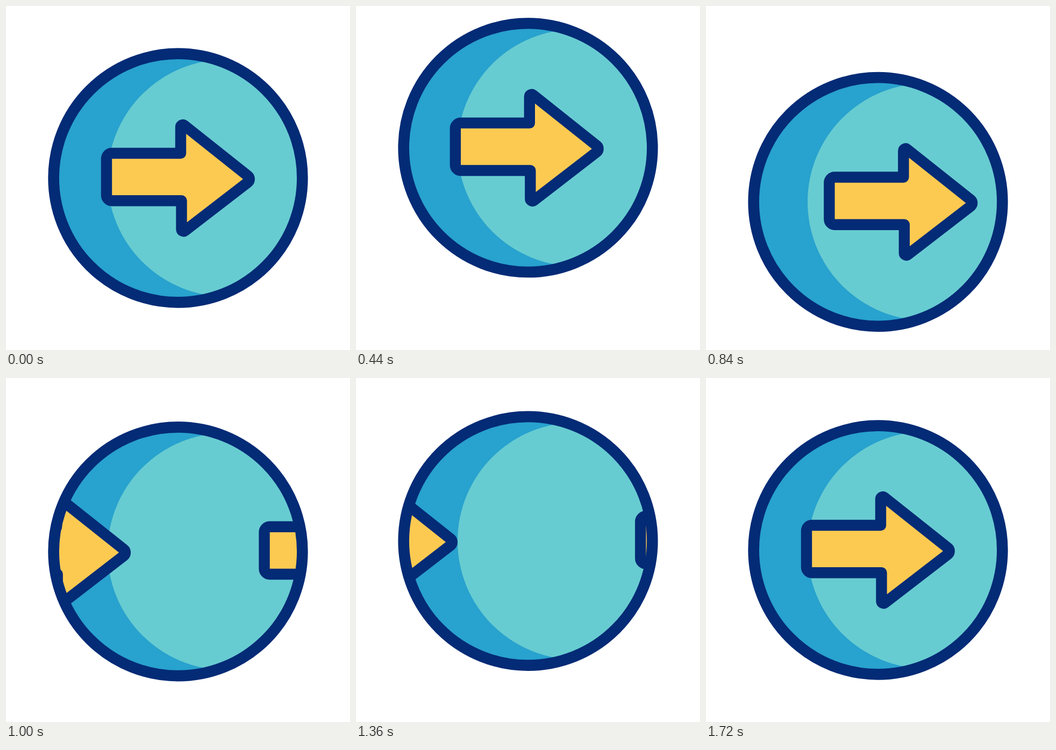
Recreate the animation shown at these times as an HTML page. Size 640 by 640 pixels, loop 2000 ms.

```html
<!DOCTYPE html>
<html lang="en">
<head>
<meta charset="utf-8">
<title>Bouncing arrow button</title>
<style>
  html, body { margin: 0; width: 100%; height: 100%; overflow: hidden; background: #fff; }
  svg { display: block; width: 100%; height: 100%; }
</style>
</head>
<body>
<svg viewBox="0 0 640 640">
  <defs>
    <clipPath id="disc"><circle cx="320" cy="320" r="231"/></clipPath>
    <path id="arrow" fill="#fdca51" stroke="#042b76" stroke-width="20.4" stroke-linejoin="round"
      d="M325 274V225A4 4 0 0 1 331.5 221.9L449.9 316A7.7 7.7 0 0 1 449.8 328.1L333 418.2
         A4 4 0 0 1 326.5 415V362.3H197A10 10 0 0 1 187 352.3V284A10 10 0 0 1 197 274Z"/>
  </defs>
  <g id="button">
    <g clip-path="url(#disc)">
      <circle cx="320" cy="320" r="231" fill="#28a2ce"/>
      <circle cx="409.5" cy="320" r="220.5" fill="#67ccd1"/>
      <use class="arrow" href="#arrow"/>
      <use class="arrow" href="#arrow"/>
      <use class="arrow" href="#arrow"/>
      <use class="arrow" href="#arrow"/>
    </g>
    <circle cx="320" cy="320" r="231.4" fill="none" stroke="#042b76" stroke-width="20.6"/>
  </g>
</svg>
<script>
  const LOOP = 2000;
  const button = document.getElementById('button');
  const arrows = document.querySelectorAll('.arrow');

  // [time in ms, vertical offset of the button]
  const bounce = [[0, 0], [400, -60], [760, 47], [800, 47], [1180, -35], [1530, 0], [LOOP, 0]];

  const smooth = u => u * u * (3 - 2 * u);

  function bounceAt(t) {
    const i = bounce.findIndex(([time]) => time > t);
    const [t0, y0] = bounce[i - 1], [t1, y1] = bounce[i];
    return y0 + (y1 - y0) * smooth((t - t0) / (t1 - t0));
  }

  // Horizontal offset of each arrow: wind up and leave, pass, pass, arrive and stop.
  const slides = [
    t => t < 337 ? -34 * smooth(t / 337)
       : t < 600 ? -34 + 0.003 * (t - 337) ** 2
       : 173.5 + 1.58 * (t - 600),
    t => 1.57 * (t - 813),
    t => 1.592 * (t - 1145),
    t => -0.00237 * Math.max(0, 1700 - t) ** 2
  ];

  function draw(now) {
    const t = now % LOOP;
    button.setAttribute('transform', `translate(0 ${bounceAt(t)})`);
    arrows.forEach((arrow, i) => arrow.setAttribute('transform', `translate(${slides[i](t)} 0)`));
  }

  let start;
  function tick(now) {
    start ??= now;
    draw(now - start);
    requestAnimationFrame(tick);
  }
  draw(0);
  requestAnimationFrame(tick);
</script>
</body>
</html>
```
